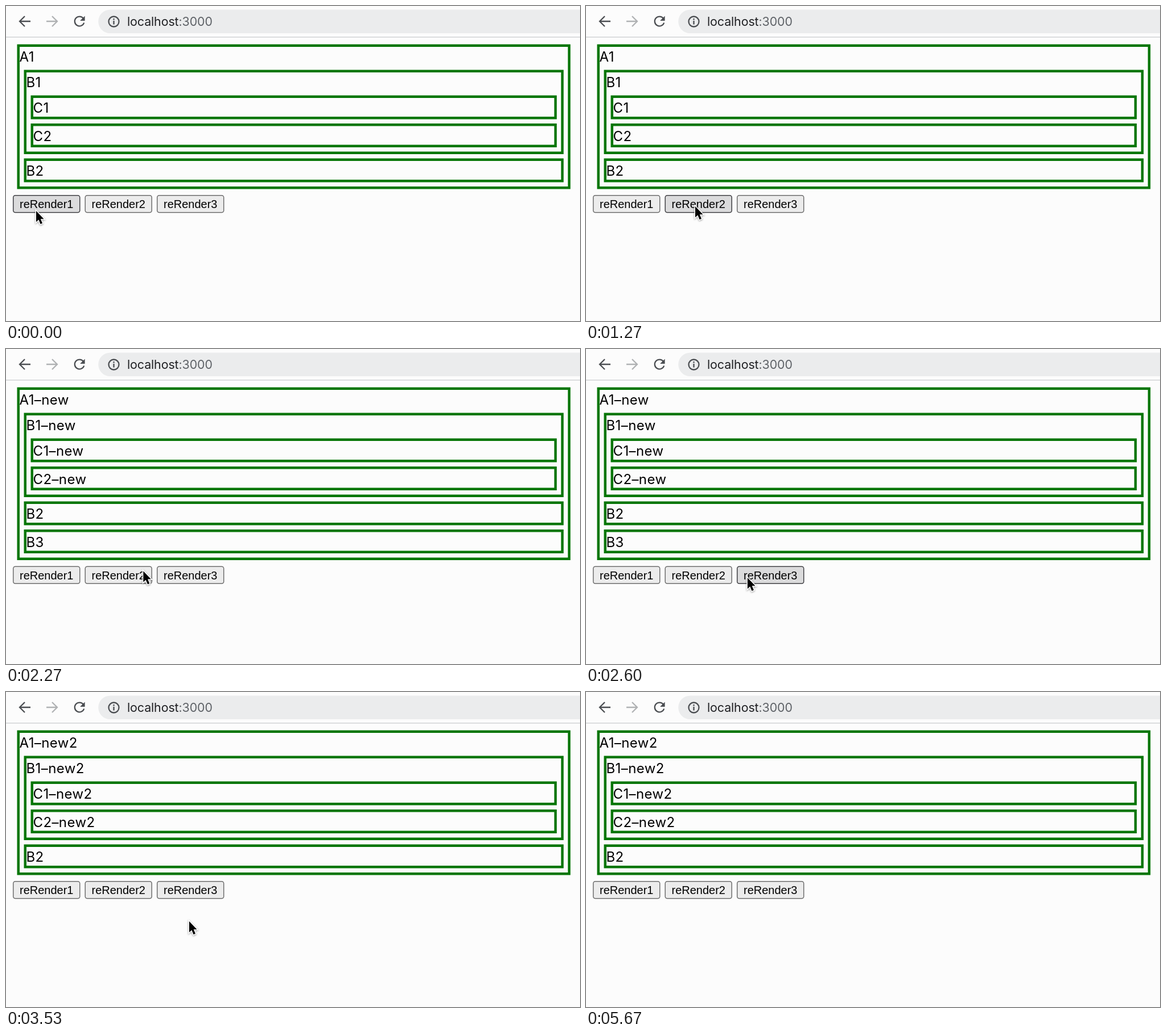
Recreate the animation shown at these times as an HTML page. Size 1009x555 px, loop 5.74 s.

```html
<!DOCTYPE html>
<html lang="en">
<head>
<meta charset="utf-8">
<title>Nested re-render</title>
<style>
  html, body { margin: 0; width: 100%; height: 100%; overflow: hidden; background: #fcfcfc; }
  svg { display: block; width: 1009px; height: 555px; }
  .label { font: 24px Inter, sans-serif; letter-spacing: .4px; }
  .url { font: 21.5px Inter, sans-serif; letter-spacing: -.15px; fill: #202124; }
  .box { fill: none; stroke: #057605; stroke-width: 4.5; }
  .icon { fill: none; stroke: #4b4e52; stroke-width: 2.3; }
  .button rect { fill: #ececec; stroke: #6e6e6e; stroke-width: 1.5; }
  .button.hover rect { fill: #dbdbdc; stroke: #414145; }
  .button text { font: 20px "Liberation Sans", Arial, sans-serif; text-anchor: middle; }
  #cursor { stroke: #fff; stroke-width: 3; paint-order: stroke; filter: drop-shadow(0 1.5px 1.5px #0006); }
</style>
</head>
<body>
<svg viewBox="0 0 1009 555">
  <path d="M0 54.8H1009" stroke="#d2d3d5" stroke-width="1.5"/>
  <path d="M1009 6.5H183a20.75 20.75 0 0 0 0 41.5H1009Z" fill="#ebeced"/>
  <path class="icon" d="M43 27H24.5M33 18L24 27L33 36"/>
  <path class="icon" d="M71 27H89.5M81 18L90 27L81 36" style="stroke:#b0b2b4"/>
  <path class="icon" d="M136 22A8.4 8.4 0 1 0 137.2 29.5"/>
  <path d="M138.6 17.5V26H130.1Z" fill="#4b4e52"/>
  <circle class="icon" cx="189.5" cy="27.5" r="9"/>
  <path class="icon" d="M189.5 26V32.5M189.5 22V24.4"/>
  <text class="url" x="213" y="35">localhost<tspan fill="#5f6368">:3000</tspan></text>
  <g id="tree"></g>
  <g id="buttons"></g>
  <path id="cursor" d="M0 0V19.5L4.4 15.5L7.6 23.2L11 21.8L7.8 14.2H13.6Z"/>
</svg>
<script>
const LOOP = 5740, STEP = 200 / 3;
const BORDER = 4.5, MARGIN = 7.5, LINE = 33, LEFT = 19.5, RIGHT = 992.2, TOP = 67.5;
const BUTTON = { x: 12, width: 118.5, height: 31.5, pitch: 126.5, gap: 10.5 };
const byId = id => document.getElementById(id);

const tree = (suffix, ...extra) => ({
  name: 'A1' + suffix,
  children: [
    { name: 'B1' + suffix, children: [{ name: 'C1' + suffix }, { name: 'C2' + suffix }] },
    { name: 'B2' },
    ...extra
  ]
});

const pages = [
  { from: 0, root: tree('') },
  { from: 1600, root: tree('–new', { name: 'B3' }), clicked: 1 },
  { from: 3400, root: tree('–new2'), clicked: 2 }
];

const smooth = k => k * k * (3 - 2 * k);
const accelerate = k => k ** 4;

// Pointer moves; sag bends the straight line downwards.
const moves = [
  { start: 400, end: 1200, from: [53, 361], to: [192, 353], sag: 34, ease: smooth },
  { start: 1650, end: 3130, from: [192, 353], to: [322, 404], sag: 22, ease: smooth },
  { start: 3700, end: 4400, from: [322, 404], to: [952, 690], sag: -60, ease: accelerate }
];

// Lays out a node like a CSS block and returns its bottom edge.
function layout({ name, children = [] }, depth, top) {
  const inset = depth * (BORDER + MARGIN), x = LEFT + inset;
  let y = top + BORDER + LINE, inner = '';
  for (const child of children) {
    const block = layout(child, depth + 1, y + MARGIN);
    inner += block.svg;
    y = block.bottom;
  }
  const bottom = y + (children.length ? MARGIN : 0) + BORDER;
  const half = BORDER / 2;
  const svg = `<rect class="box" x="${x + half}" y="${top + half}"
      width="${RIGHT - inset - x - BORDER}" height="${bottom - top - BORDER}"/>
    <text class="label" x="${x + BORDER - .5}" y="${top + 30.5}">${name}</text>`;
  return { bottom, svg: svg + inner };
}

byId('buttons').innerHTML = [0, 1, 2].map(i =>
  `<g class="button" transform="translate(${BUTTON.x + i * BUTTON.pitch})">
    <rect x=".75" y=".75" width="${BUTTON.width - 1.5}" height="${BUTTON.height - 1.5}" rx="3.5"/>
    <text x="${BUTTON.width / 2}" y="23">reRender${i + 1}</text>
  </g>`).join('');
const buttons = [...byId('buttons').children];

let shown, buttonTop;
function show(page) {
  const { svg, bottom } = layout(page.root, 0, TOP);
  shown = page;
  buttonTop = bottom + BUTTON.gap;
  byId('tree').innerHTML = svg;
  byId('buttons').setAttribute('transform', `translate(0 ${buttonTop})`);
}

function pointerAt(t) {
  const { start, end, from, to, sag, ease } = moves.filter(m => m.start <= t).pop() || moves[0];
  const k = ease(Math.min(1, Math.max(0, (t - start) / (end - start))));
  const mix = axis => from[axis] + (to[axis] - from[axis]) * k;
  return [mix(0), mix(1) + sag * Math.sin(Math.PI * k) ** 2];
}

function frame(now) {
  // Advances at 15 frames per second, on a 10 ms clock.
  const tick = Math.floor((now % LOOP + 5) / STEP);
  const t = Math.round(tick * STEP / 10) * 10;
  const page = pages.filter(p => p.from <= t).pop();
  if (page !== shown) show(page);

  const [x, y] = pointerAt(t);
  byId('cursor').setAttribute('transform', `translate(${x} ${y})`);
  buttons.forEach((button, i) => {
    const dx = x - BUTTON.x - i * BUTTON.pitch, dy = y - buttonTop;
    const inside = dx >= 0 && dx < BUTTON.width && dy >= 0 && dy < BUTTON.height;
    // A clicked button stays idle once the page has rendered again.
    button.classList.toggle('hover', inside && i !== page.clicked);
  });
  requestAnimationFrame(frame);
}
frame(0);
</script>
</body>
</html>
```
